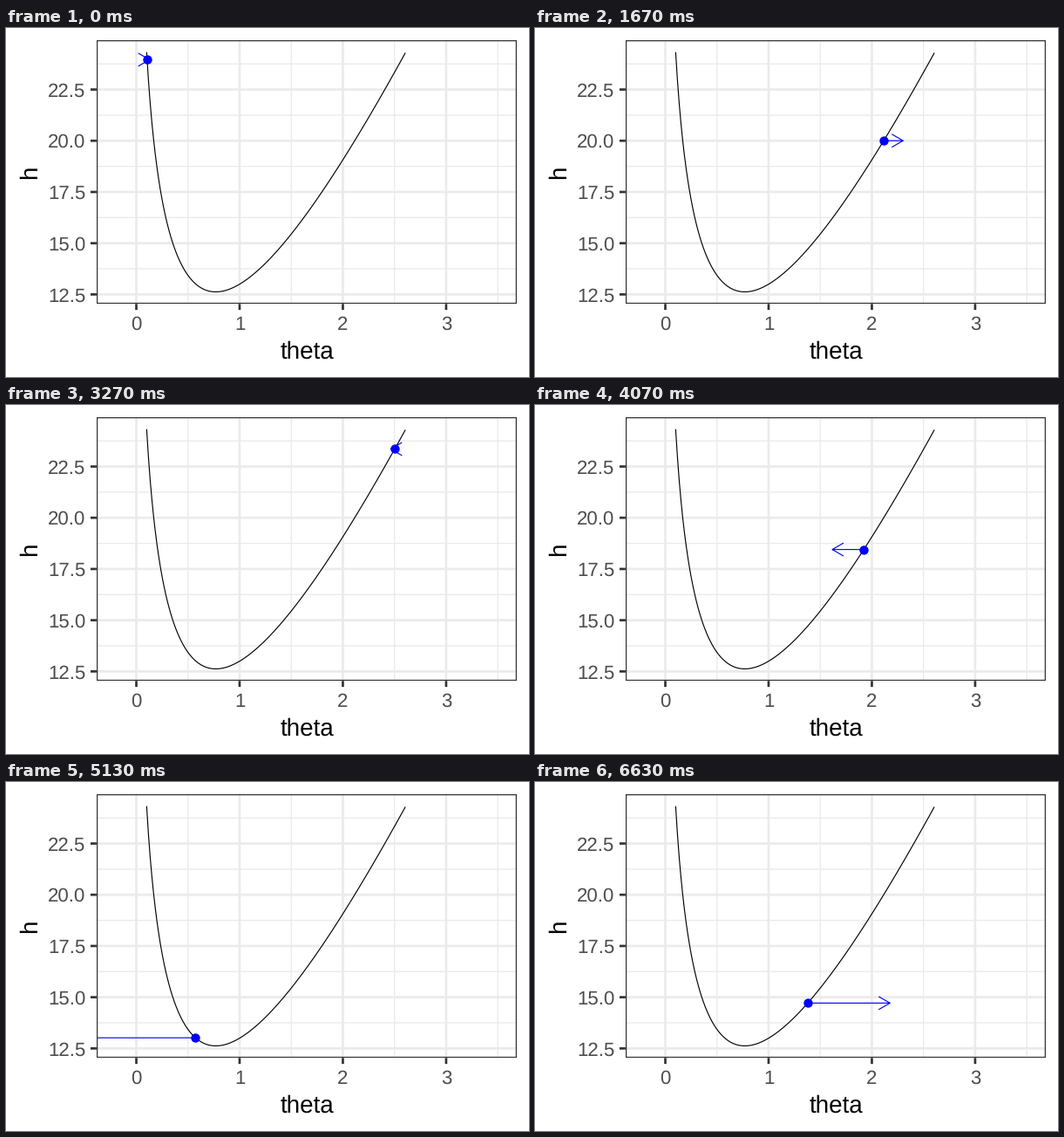
Write a matplotlib script that moves like this. It is 600x400 px and loops after 6670 ms.

```python
import numpy as np
import matplotlib.pyplot as plt
from matplotlib.animation import FuncAnimation
from matplotlib.patches import Rectangle

plt.rcParams["font.family"] = "Liberation Sans"
plt.rcParams["text.hinting"] = "none"

W, H, DPI = 600, 400, 100
PX = 72 / DPI  # points per pixel
LEFT, RIGHT, TOP, BOTTOM = 103.9, 586.1, 13.9, 316.2
FRAMES, LOOP = 200, 6670
STEP = 0.01


def h(theta):
    return 13 * theta - 10 * np.log(theta)


def accel(theta):
    return 10 / theta - 13


def leapfrog(theta, v, steps):
    path = []
    for _ in range(steps):
        v += accel(theta) * STEP / 2
        theta += v * STEP
        v += accel(theta) * STEP / 2
        path.append((theta, v))
    return path


path = leapfrog(0.1, 0.0, FRAMES)

# Panel limits with 5 % expansion
low, high = h(10 / 13), h(0.1)
pad = 0.05 * (high - low)
XLIM = (-0.2 - 0.185, 3.5 + 0.185)
YLIM = (low - pad, high + pad)
x_unit = (RIGHT - LEFT) / (XLIM[1] - XLIM[0])
y_unit = (BOTTOM - TOP) / (YLIM[1] - YLIM[0])

fig = plt.figure(figsize=(W / DPI, H / DPI), dpi=DPI, facecolor="white")
ax = fig.add_axes([LEFT / W, 1 - BOTTOM / H, (RIGHT - LEFT) / W, (BOTTOM - TOP) / H])
ax.set(xlim=XLIM, ylim=YLIM, xticks=[], yticks=[])
ax.spines[:].set_visible(False)


def text(x, y, s, size, color, **kw):
    fig.text(x / W, 1 - y / H, s, fontsize=size, color=color,
             va="baseline", rotation_mode="anchor", **kw)


def grid(xs, ys, width):
    style = dict(color="#EBEBEB", lw=width * PX, snap=False, zorder=1)
    for x in xs:
        ax.axvline(x, **style)
    for y in ys:
        ax.axhline(y, **style)


def tick(dx, dy, x, y):
    ax.plot([x, x - dx / x_unit], [y, y - dy / y_unit], color="#333333",
            lw=2.7 * PX, solid_capstyle="butt", clip_on=False, snap=False)


x_major = np.arange(4)
y_major = np.arange(12.5, 23, 2.5)
grid(x_major + 0.5, y_major + 1.25, 1.35)
grid(x_major, y_major, 2.7)

for x in x_major:
    tick(0, 6.94, x, YLIM[0])
    text(LEFT + (x - XLIM[0]) * x_unit, 346, f"{x}", 16, "#4D4D4D", ha="center")
for y in y_major:
    tick(6.94, 0, XLIM[0], y)
    text(91.4, BOTTOM - (y - YLIM[0]) * y_unit + 8, f"{y:.1f}", 16, "#4D4D4D", ha="right")

text((LEFT + RIGHT) / 2, 379, "theta", 20, "black", ha="center")
text(34.7, (TOP + BOTTOM) / 2, "h", 20, "black", ha="center", rotation=90)

theta = np.linspace(0.1, 2.605, 300)
ax.plot(theta, h(theta), color="black", lw=1.15 * PX, solid_capstyle="butt", zorder=3)
arrow, = ax.plot([], [], color="blue", lw=1.15 * PX, solid_capstyle="butt",
                 snap=False, zorder=4)
ball, = ax.plot([], [], "o", color="blue", ms=10.4 * PX, mew=0, zorder=5)

# Only the inner half of the border shows
ax.add_patch(Rectangle((0, 0), 1, 1, transform=ax.transAxes, fill=False,
                       ec="#333333", lw=2.7 * PX, snap=False, zorder=6))

BARB_X = 15 * np.cos(np.pi / 6) / x_unit
BARB_Y = 15 * np.sin(np.pi / 6) / y_unit


def draw(i):
    x, v = path[i]
    y, way = h(x), np.sign(v)
    tip = x + way * np.exp(abs(v)) / 100
    back = tip - way * BARB_X
    arrow.set_data([x, tip, np.nan, back, tip, back],
                   [y, y, np.nan, y + BARB_Y, y, y - BARB_Y])
    ball.set_data([x], [y])
    return arrow, ball


anim = FuncAnimation(fig, draw, frames=FRAMES, interval=LOOP / FRAMES, repeat=True)
plt.show()
```
